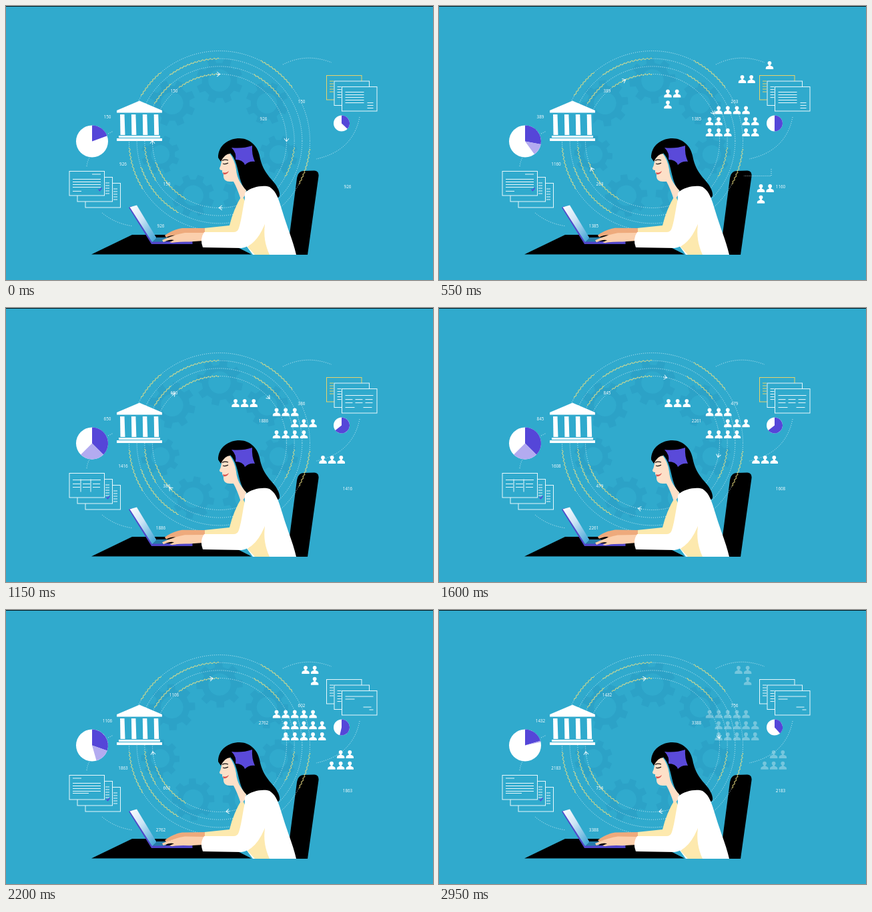
An HTML page that plays this animation: 640x412 px, repeating every 3.02 s.

```html
<!DOCTYPE html>
<html lang="en">
<head>
<meta charset="utf-8">
<title>Woman at a laptop</title>
<style>
html, body { margin: 0; width: 100%; height: 100%; overflow: hidden; background: #30aacd; }
svg { display: block; width: 100vw; height: 100vh; }
text { font: 6.3px "Open Sans", "Noto Sans", sans-serif; fill: #fff; text-anchor: middle; }
.dots { fill: none; stroke: #e4f6fb; stroke-width: .9; stroke-dasharray: 1 2; }
.wave { fill: none; stroke: #f3e06f; stroke-width: .9; }
.line { fill: none; stroke: #e9f8fc; }
.line rect { fill: #30aacd; }
</style>
</head>
<body>
<svg viewBox="0 0 640 412">
  <defs>
    <linearGradient id="glass" x1="0" y1="0" x2=".8" y2="1">
      <stop offset="0" stop-color="#fff"/>
      <stop offset=".45" stop-color="#cfe5f6"/>
      <stop offset="1" stop-color="#4aa9d8"/>
    </linearGradient>
    <g id="person">
      <circle cy="-3.2" r="2.9"/>
      <path d="M-5.7 6V4.2Q-5.7 2.2-3.5 1.6L-1.4.8V-1H1.4V.8L3.5 1.6Q5.7 2.2 5.7 4.2V6Z"/>
    </g>
  </defs>
  <rect width="640" height="1" fill="#04161b"/>
  <g id="gears" fill="#248fbb" fill-opacity=".3" fill-rule="evenodd"></g>
  <path d="M421 374L436 259Q438 248 446 248L462 247.500Q469.500 248 468.500 256L452 374Z"/>
  <g id="rings"></g>
  <g class="dots">
    <path d="M415 88Q450 70 488 85"/>
    <path d="M530 167Q520 218 465 230"/>
    <path d="M144 311Q163 327 190 331"/>
    <path d="M121 241Q122 233 125 228"/>
    <path d="M153 192L161 188"/>
  </g>
  <g id="arrows" class="line"></g>

  <!-- bank -->
  <path fill="#30aacd" d="M169 160H231V203H169Z"/>
  <path fill="#fff" d="M200 142.500L234 157V160.500H166V157ZM169 195H231V198H169ZM166 199H234V203H166Z"/>
  <g id="columns" fill="#fff"></g>

  <g id="pies"></g>
  <g id="cards"></g>

  <!-- desk and laptop -->
  <path d="M128 373.500L189 344H310L368 373.500Z"/>
  <path fill="#5146c9" d="M184 303L188 301L222 354H279.500V358H218Z"/>
  <path fill="url(#glass)" d="M185.500 302.500L196 299.500L226 349.500L219 355Z"/>
  <path fill="#277da9" d="M226 348H244L239 354.500H220Z"/>

  <!-- woman -->
  <path fill="#fde9ae" d="M354 284Q341 305 335 330L297 334V342L348 346L364 308Z"/>
  <path id="farHand" fill="#eeaa7c" d="M298 334H264Q250 336 238 345L240 348Q249 344 254 345L248 349L252 350L264 345L298 342Z"/>
  <path d="M318 228C318 209 334 199 350 199C365 199 377 210 380 225C384 247 394 256 403 267C412 279 413 292 403 287C386 279 368 284 358 276C346 258 350 236 336 221Q325 214 318 228Z"/>
  <path fill="#fde0c8" d="M328 218Q322 227 323 234Q322 240 320 244Q320 247 324 247L324 250L326 253L326 257Q327 264 335 264L341 264Q347 275 352 291Q360 286 360 277C351 267 346 258 345 246Q343 231 334 220Z"/>
  <path d="M318 228Q320 214 334 213L336 222Q328 222 322 234Z"/>
  <path fill="none" stroke="#111" stroke-width="1.200" d="M324 232.500Q328 230 333 232M325 237Q329 238.500 333 236"/>
  <path fill="#d9534f" d="M325 250Q330 252 334 248Q332 254 326 253Z"/>
  <path fill="#5a4ad9" d="M338 213Q354 215 369 210Q368 223 373 234Q364 233 358 239Q355 231 344 231Q346 221 338 213Z"/>
  <path fill="#fff" d="M358 281C368 271 387 269 395 272C406 279 409 292 414 308C421 332 430 352 435 374H370L356 355Z"/>
  <path fill="#fde9ae" d="M388 328Q376 352 362 362L373 374H395C388 358 386 345 388 328Z"/>
  <path id="nearHand" fill="#fbcfac" d="M296 341L268 341Q251 344 234 352L236 355Q246 350 252 352L245 355L249 356Q258 354 275 354.500L296 353Z"/>
  <path fill="#fff" d="M361 279C355 298 354 319 349 334Q347 340 341 340L297 340Q290 350 295 363L353 364Q374 361 387 330L383 287Z"/>

  <g id="crowds" fill="#fff"></g>
  <g id="labels"></g>
</svg>
<script>
const LOOP = 3020, STEP = 50, PHASE = 1000, CX = 320, CY = 203, RAD = Math.PI / 180;
const $ = id => document.getElementById(id);
const range = n => [...Array(n).keys()];
const make = (parent, tag, attrs = {}) => {
  const el = document.createElementNS('http://www.w3.org/2000/svg', tag);
  for (const k in attrs) el.setAttribute(k, attrs[k]);
  return parent.appendChild(el);
};
// Angles run clockwise from twelve o'clock.
const polar = (x, y, r, a) =>
  `${(x + r * Math.sin(a * RAD)).toFixed(2)} ${(y - r * Math.cos(a * RAD)).toFixed(2)}`;

// Gears spread evenly around the rings
const gears = range(7).map(i => {
  const r = 35 - i % 3 * 3, hole = r * .48;
  const teeth = range(32).map(k => {
    const side = k % 4;
    return polar(0, 0, side % 3 ? r : r * .76, (k >> 2) * 45 + [-13, -9, 9, 13][side]);
  });
  const d = `M${teeth.join('L')}ZM${hole} 0A${hole} ${hole} 0 1 0 ${-hole} 0A${hole} ${hole} 0 1 0 ${hole} 0Z`;
  const place = polar(CX, CY, 91, i * 360 / 7);
  return { el: make($('gears'), 'path', { d }), place, dir: i % 2 ? -1 : 1 };
});

// Dotted rings with wavy stretches, alternating between two layouts
const wave = (r, from, to) => {
  const n = Math.round((to - from) * RAD * r / .7);
  const pts = range(n).map(i => polar(CX, CY, r + Math.sin(i * .75), from + i * (to - from) / n));
  make($('rings'), 'path', { class: 'wave', d: 'M' + pts.join('L') });
};
const layouts = [
  [[-60, -40], [27, 54], [95, 119], [-122, -94]],
  [[-37, 0], [-150, -108]]
];
for (const i of range(4)) {
  const r = 135.5 - i * 11.65;
  make($('rings'), 'circle', { class: 'dots', cx: CX, cy: CY, r });
  for (const [from, to] of layouts[i % 2]) wave(r, from, to);
  make($('arrows'), 'path', { d: 'M-2 -3.5L2.5 0L-2 3.5M-3 0H2',
    transform: `rotate(${i * 90}) translate(0 -100.5)` });
  make($('columns'), 'path', { d: `M${171 + i * 16.9} 163h6.5l1 31h-7Z` });
}

// Pies
const pie = (x, y, r) => {
  make($('pies'), 'circle', { cx: x, cy: y, r, fill: '#fff' });
  return ['#5546d8', '#b3abf0'].map(fill => {
    const el = make($('pies'), 'path', { fill });
    return (from, to) => el.setAttribute('d', `M${x} ${y}L${polar(x, y, r, from)}` +
      `A${r} ${r} 0 ${+(to - from > 180)} 1 ${polar(x, y, r, to)}Z`);
  });
};
const leftPie = pie(129, 203.5, 24), rightPie = pie(503, 176.5, 12);

// Cards: ruled lines in three-deep stacks
const rows = (x, y, n, w, gap = 4) => range(n).map(i => `M${x} ${y + i * gap}h${w}`).join('');
const stack = (x, y, dx, dy, margin) => range(3).map(i => {
  const g = make($('cards'), 'g', { class: 'line', transform: `translate(${x + i * dx} ${y + i * dy})` });
  make(g, 'rect', { width: 52.5, height: 36.5 });
  const text = make(g, 'path', { d: rows(margin, 8.5, 5, 6) });
  const tick = make(g, 'path', { d: 'M43.5 27l2 2 3-4', opacity: 0,
    style: 'stroke:#5546d8;stroke-width:1.5' });
  return { g, text, tick };
});
const left = stack(119, 266.5, -12, -9, 42), right = stack(480.5, 104.5, 11.5, 8.5, 4.5);
const grid = range(3).map(i => rows(5 + i * 15, 16, 2, 11, 5)).join('') + rows(5, 10, 1, 42);
const title = rows(5, 4.5, 1, 13);
const leftPages = [
  rows(34, 4.5, 1, 13) + rows(5, 12, 4, 42) + rows(5, 30, 1, 13),
  grid + 'M17 9v19M32 9v19',
  title + rows(5, 12, 4, 42) + rows(5, 27, 1, 24)
];
const rightPages = [
  rows(5, 8, 5, 28) + rows(38, 24, 3, 9),
  grid + rows(5, 28, 1, 14) + rows(32, 28, 1, 13),
  rows(5, 8.5, 1, 42) + rows(5, 12.5, 1, 14) + rows(32, 24.5, 1, 12) + rows(41, 28.5, 1, 6)
];

// Groups of people: x, y, then rows with # for a person
const crowds = [
  [[454.5, 89, '   #'], [454.5, 110, '##'], [343, 131.5, '##/#'],
   [405.5, 156.5, ' ####/##  ##/### ##'], [482.5, 274, '##/#']],
  [[344, 143, '###'], [405.5, 156.5, '###/  ###/####'], [475, 228, '###']],
  [[449, 90, '##/ #'], [405.5, 156.5, '#####/ #####/ #####'], [488, 217, ' ##/###']]
].map(groups => {
  const g = make($('crowds'), 'g');
  for (const [x, y, pattern] of groups)
    pattern.split('/').forEach((row, j) => [...row].forEach((c, i) => {
      if (c === '#') make(g, 'use', { href: '#person', x: x + i * 13.65, y: y + j * 16.8 });
    }));
  return g;
});
make(crowds[0], 'path', { class: 'dots', d: 'M498 245V255.500H457' });

// Counters: start, gain per second, two places
const counters = [
  [150, 434.6, [252, 130], [152, 169.2]],
  [926, 426.1, [175.5, 239.8], [512, 274]],
  [150, 205.4, [241, 269.7], [443, 145.6]],
  [926, 834.6, [232, 333.4], [386, 172]]
].map(([start, rate, ...spots]) => ({
  start, rate, els: spots.map(([x, y]) => make($('labels'), 'text', { x, y }))
}));

function draw(t) {
  const phase = Math.min(2, Math.floor(t / PHASE)), u = t - phase * PHASE;
  for (const { el, place, dir } of gears)
    el.setAttribute('transform', `translate(${place}) rotate(${dir * t / LOOP * 90 + 22})`);
  $('arrows').setAttribute('transform', `translate(${CX} ${CY}) rotate(${.12 * t - 1})`);

  const grow = Math.min(1, t / 1150, (LOOP - t) / 1350), purple = 70 + 65 * grow;
  leftPie[0](0, purple);
  leftPie[1](purple, purple + 90 * grow);
  rightPie[0](0, 133 + 99 * grow);

  left[2].text.setAttribute('d', leftPages[phase]);
  right[2].text.setAttribute('d', rightPages[phase]);
  right[0].g.style.stroke = phase < 2 ? '#e8d36a' : '';
  left[2].tick.setAttribute('opacity', +(phase === 0));
  left[1].tick.setAttribute('opacity', +(phase > 0));

  const fade = Math.max(0, Math.min(1, u / 150, (PHASE - u) / 150));
  crowds.forEach((g, i) => g.style.opacity = i === phase ? fade : 0);

  for (const { start, rate, els } of counters)
    for (const el of els) el.textContent = Math.round(start + rate * t / 1000);

  const tap = Math.sin(t / LOOP * Math.PI * 16);
  $('farHand').setAttribute('transform', `rotate(${tap} 298 338)`);
  $('nearHand').setAttribute('transform', `rotate(${-tap} 296 347)`);
}

const begin = performance.now();
(function tick() {
  const t = (performance.now() - begin) % LOOP;
  draw(Math.floor(t / STEP) * STEP);
  requestAnimationFrame(tick);
})();
</script>
</body>
</html>
```
